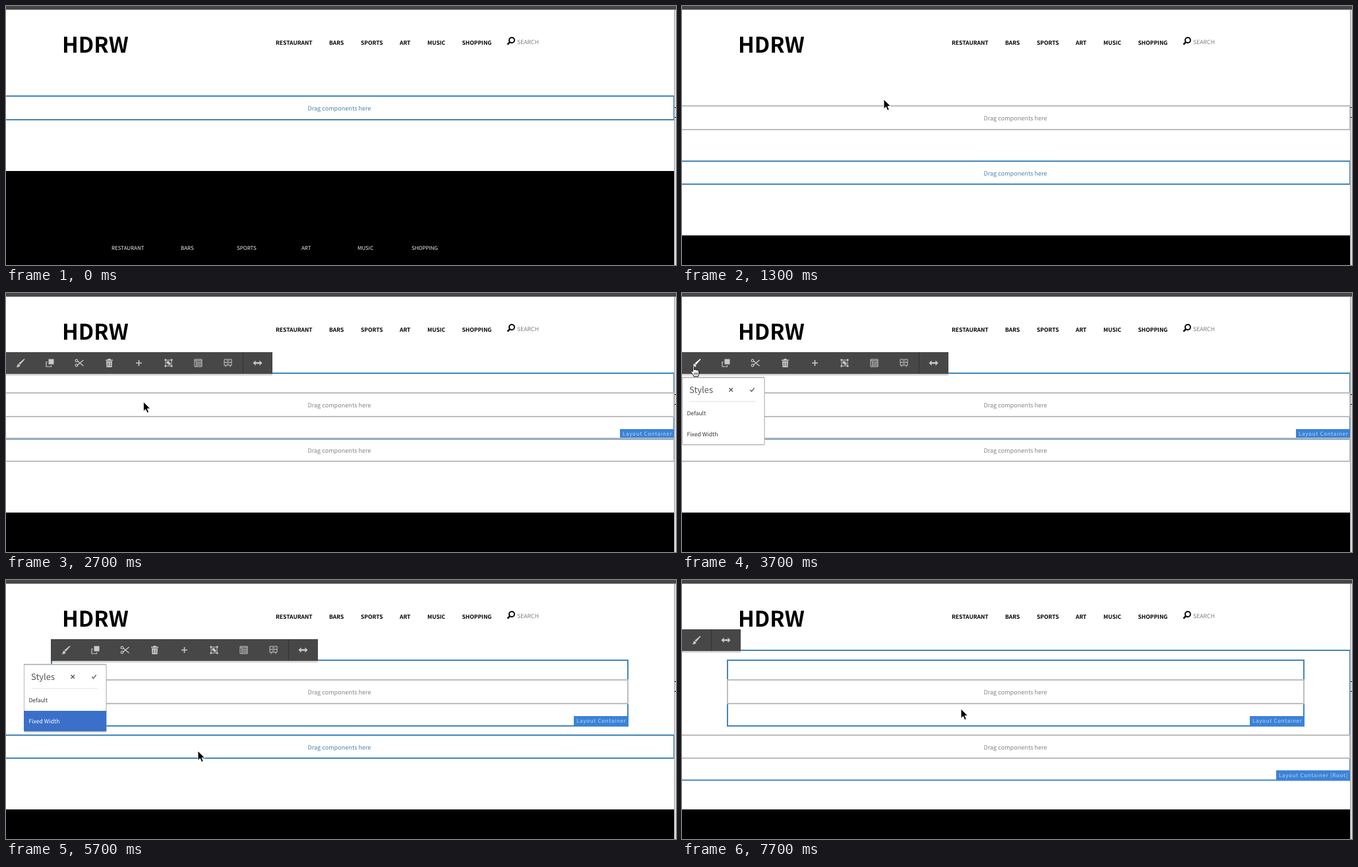
Write an HTML page that moves like this. It is 1016 px wide and 394 px high and loops after 7.8 s.

```html
<!DOCTYPE html>
<html lang="en">
<head>
<meta charset="utf-8">
<title>Layout container demo</title>
<style>
html, body { margin: 0; width: 100%; height: 100%; overflow: hidden; background: #fff; }
svg { display: block; }
text {
  font-family: "Noto Sans CJK SC", "Noto Sans CJK JP", "Noto Sans CJK KR", "Noto Sans", sans-serif;
  text-rendering: geometricPrecision;
}
</style>
</head>
<body>
<svg id="stage" width="1016" height="394" viewBox="0 0 1016 394"></svg>
<script>
const LOOP = 7800, STEP = 100;
const BLUE = '#4286b8', GREY = '#bdbdbd', BAR = '#474747';

// time, x, y of the pointer tip
const PATH = [
  [200, 2, 230], [800, 290, 160], [1300, 306, 142], [1600, 306, 142], [1900, 332, 199],
  [2400, 332, 199], [3100, 18, 114], [3200, 13, 111], [3800, 13, 111], [4400, 33, 208],
  [4900, 33, 208], [5700, 291, 260], [6300, 337, 284], [6700, 337, 284], [6800, 338, 285],
  [7300, 338, 285], [7700, 423, 196]
];

const MENU = ['RESTAURANT', 'BARS', 'SPORTS', 'ART', 'MUSIC', 'SHOPPING'];
const NAV_X = [409, 490, 538, 597, 639, 691.5];
const FOOT_X = [160, 265, 350, 448, 533, 615];

const rect = (x, y, w, h, fill, extra = '') =>
  `<rect x="${x}" y="${y}" width="${w}" height="${h}" fill="${fill}" ${extra}/>`;
const frame = (x, y, w, h, color) =>
  rect(x, y, w, h, 'none', `stroke="${color}" stroke-width="2"`);
const text = (s, x, y, size, fill, extra = '') =>
  `<text x="${x}" y="${y}" font-size="${size}" fill="${fill}" ${extra}>${s}</text>`;
const line = (d, color, width = 1) =>
  `<path d="${d}" fill="none" stroke="${color}" stroke-width="${width}"/>`;
const at = (x, y, s) => `<g transform="translate(${x} ${y})">${s}</g>`;

// Toolbar icons, centred on the origin
const INK = '#c9c9c9';
const solid = d => `<path d="${d}" fill="${INK}"/>`;
const brush = color =>
  `<path d="M6-6.5 7-5.5 0 2.5-2.2.6Z M-3 1 0 3.4C-.5 6-3 6.5-6 6 -4 5-4.5 2-3 1Z" fill="${color}"/>`;
const arrows = solid('M-7 0-3-4V-1.3H3V-4L7 0 3 4V1.3H-3V4Z');
const ICONS = [
  brush(INK),
  rect(-2, -6, 8, 8, INK) + line('M-3.5-1.5H-5.5V5.5H2V3.5', INK, 1.2),
  line('M-3-3 6 4.5M-3 3 6-4.5', INK, 1.4) +
    `<g fill="none" stroke="${INK}" stroke-width="1.2"><circle cx="-4.5" cy="-3.6" r="1.8"/><circle cx="-4.5" cy="3.6" r="1.8"/></g>`,
  solid('M-5.5-5H-2V-6.5H2V-5H5.5V-3.5H-5.5Z') +
    solid('M-4.5-2.7H4.5L4 6.5H-4Z') + line('M-1.7-1V5M1.7-1V5', BAR, .9),
  line('M-4.5 0H4.5M0-4.5V4.5', INK, 1.6),
  line('M-4.5-4.5H4.5V4.5H-4.5Z', INK, 1) + rect(-2.8, -2.8, 4, 4, INK) + rect(-.5, -.5, 3.4, 3.4, INK) +
    [[-6, -6], [3.5, -6], [-6, 3.5], [3.5, 3.5]].map(([x, y]) => rect(x, y, 2.5, 2.5, INK)).join(''),
  line('M-5.5-5.5H5.5V5.5H-5.5Z M-5.5-3.5H5.5M-2-1H5M-2 1.2H5M-2 3.4H5M-2.8-3V5', INK, 1),
  line('M-5.5-5.5H5.5V3.5H-5.5Z M-5.5-1H5.5M-2-3.3H2M-2 1.3H2M-3.5 3.5V6M3.5 3.5V6', INK, 1),
  arrows
];

const ARROW = '<path d="M0 0V14.5L3.3 11.4 5.6 16.8 8.2 15.7 5.9 10.4H10.4Z" fill="#000" stroke="#fff" stroke-width=".9"/>';
const HAND = '<path d="M3.2 1.2C3.2-.2 5.4-.2 5.4 1.2V6C6 5 7.6 5.2 7.9 6.2 8.7 5.4 10 5.7 10.3 6.8 11.3 6.2 12.7 6.8 12.7 8V11.5C12.7 13 11.6 14 11.6 16H5C4.8 14 1.6 11 .6 8.8 .1 7.4 1.6 6.9 2.4 7.8L3.2 8.8Z" fill="#fff" stroke="#000"/>' +
  line('M6 10V13.5M8.1 10V13.5M10.2 10V13.5', '#000', .8);

function page(footerTop) {
  return rect(0, 0, 1016, 394, '#fff') +
    text('HDRW', 85, 70.5, 32.8, '#000', 'font-weight="600"') +
    MENU.map((s, i) => text(s, NAV_X[i], 59, 8.5, '#000', 'font-weight="600"')).join('') +
    '<circle cx="767" cy="52" r="4" fill="none" stroke="#000" stroke-width="1.9"/>' +
    line('M764 55 760.5 58.5', '#000', 2.5) +
    text('SEARCH', 775, 58, 8.7, '#7c7c7c') +
    rect(0, footerTop, 1013, 394, '#000') +
    MENU.map((s, i) => text(s, FOOT_X[i], footerTop + 120, 7.95, '#f2f2f2')).join('');
}

function edges() {
  return rect(1013, 6, 3, 388, '#dcdcdc') + rect(1013, 6, 1, 388, '#a5a5a5') +
    rect(1014, 154, 2, 1, '#000') + rect(1014, 169, 2, 1, '#000') +
    rect(0, 0, 1016, 5, '#474546') + rect(0, 5, 1016, 1, '#8a8a8a');
}

function dropZone(y, h, color, fixed) {
  const ink = color === BLUE ? '#4c86ae' : '#858585';
  return (fixed ? frame(69, y, 874, h, color) : frame(-5, y, 1018, h, color)) +
    text('Drag components here', 505.5, y + 22, 9.1, ink, 'text-anchor="middle"');
}

function outline(x, y, right, bottom, name, labelWidth) {
  return frame(x, y, right - x, bottom - y, BLUE) +
    rect(right + 1 - labelWidth, bottom - 15, labelWidth, 15, '#3b82d8') +
    text(name, right + 5 - labelWidth, bottom - 5, 8, '#bcd9f8', 'letter-spacing=".7"');
}
const inner = fixed => outline(fixed ? 69 : -5, 122, fixed ? 943 : 1013, 222, 'Layout Container', 83);

function toolbar(x, y, icons) {
  const w = icons.length * 45;
  return rect(x, y + 1, w, 34.5, '#000', 'opacity=".18"') + rect(x, y, w, 33, BAR) +
    rect(x + w - 45, y, 1, 33, '#333') +
    icons.map((icon, i) => at(x + 22.5 + i * 45, y + 16.5, icon)).join('');
}

function stylesPanel(x, chosen) {
  return at(x, 0,
    rect(0, 129, 126, 103, '#000', 'rx="2" opacity=".15"') +
    rect(.5, 128.5, 124.5, 102, '#fff', 'rx="1.5" stroke="#b9b9b9"') +
    line('M0 128.5H125', '#a8a8a8', 1.5) + line('M11 165H113', '#e4e4e4') +
    text('Styles', 11, 152, 13, '#555', 'font-weight="300"') +
    line('M71.5 144.5 77 150M77 144.5 71.5 150', '#555', 1.4) +
    line('M103.3 147.3 105.5 149.7 109.7 144.3', '#555', 1.3) +
    text('Default', 7.5, 186, 8.5, '#333') +
    (chosen ? rect(0, 199, 125, 31, '#3a70c9') : '') +
    text('Fixed Width', 7.5, 218, 8.6, chosen ? '#fff' : '#333'));
}

function pointer(t) {
  if (t < PATH[0][0]) return '';
  let i = 0;
  while (i < PATH.length - 2 && t >= PATH[i + 1][0]) i++;
  const [t0, x0, y0] = PATH[i], [t1, x1, y1] = PATH[i + 1];
  const u = Math.min(1, (t - t0) / (t1 - t0)), k = u * u * (3 - 2 * u);
  return at(x0 + (x1 - x0) * k, y0 + (y1 - y0) * k, t >= 3000 && t < 5200 ? HAND : ARROW);
}

function draw(t) {
  const dropped = t >= 1000, selected = t >= 2500 && t < 6300;
  const fixed = t >= 4700, root = t >= 6300;
  const roomy = t < 1500 || fixed;
  let s = page(!dropped ? 251 : roomy ? 349 : 334);

  if (root) s += outline(-5, 107, 1013, 304.5, 'Layout Container [Root]', 113);
  if (selected || t >= 7500) s += inner(fixed);
  if (!dropped) {
    s += dropZone(137, 36, BLUE);
  } else {
    const firstBlue = t >= 1800 && t < 2500;
    const secondBlue = t < 2500 || (t >= 5200 && t < 6300);
    s += dropZone(152, 36, firstBlue ? BLUE : GREY, fixed) +
      dropZone(roomy ? 236 : 221, 35, secondBlue ? BLUE : GREY);
  }
  s += edges();

  if (selected) {
    const icons = t >= 3400 && !fixed ? [brush('#fff'), ...ICONS.slice(1)] : ICONS;
    s += toolbar(fixed ? 68 : -1, 90, icons);
    if (t >= 3400) s += stylesPanel(fixed ? 27 : 0, t >= 4500);
  }
  if (root) s += toolbar(-1, 75, [ICONS[0], arrows]);
  stage.innerHTML = s + pointer(t);
}

const stage = document.getElementById('stage');
const start = performance.now();
let shown = -1;
function tick() {
  const t = Math.floor((performance.now() - start) % LOOP / STEP) * STEP;
  if (t !== shown) draw(shown = t);
  requestAnimationFrame(tick);
}
tick();
</script>
</body>
</html>
```
